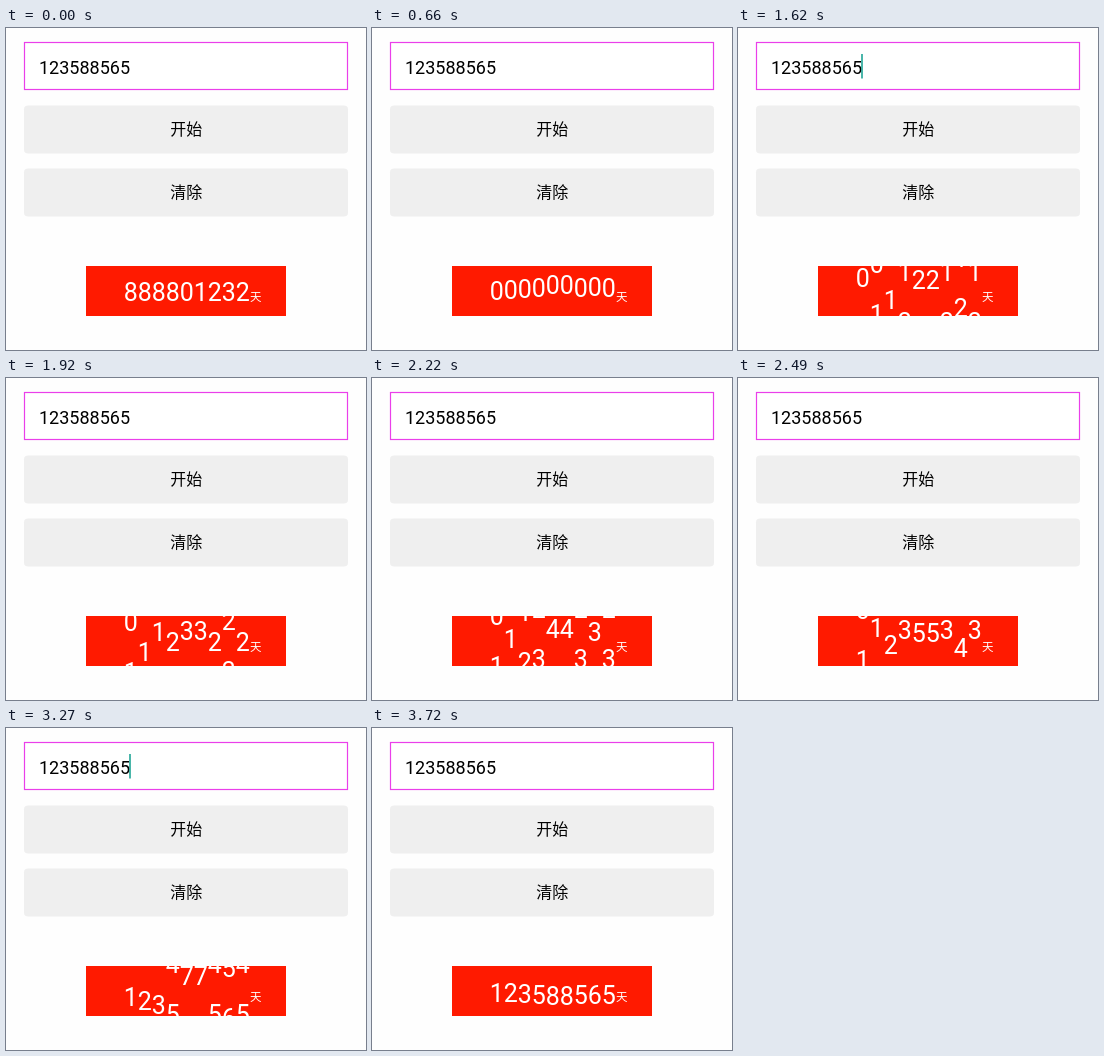
An HTML page for the animation above (3.9 s loop, 360 by 322 pixels).

```html
<!DOCTYPE html>
<html lang="zh-CN">
<head>
<meta charset="utf-8">
<style>
html, body { margin: 0; width: 100%; height: 100%; overflow: hidden; background: #fefefe; }
svg { display: block; font-family: Roboto, "Noto Sans CJK SC", "Noto Sans CJK", sans-serif; }
</style>
</head>
<body>
<svg width="360" height="322" viewBox="0 0 360 322">
  <clipPath id="window"><rect x="80" y="238" width="200" height="50"/></clipPath>
  <rect x="18.5" y="14.5" width="323" height="47" fill="#fff" stroke="#ea3fea" stroke-width="1.2"/>
  <text x="33" y="45.5" font-size="18">123588565</text>
  <rect id="caret" x="123.2" y="26" width="1.6" height="24.5" fill="#1fa596"/>
  <g fill="#efefef">
    <rect x="18" y="77.5" width="324" height="48" rx="4"/>
    <rect x="18" y="140.5" width="324" height="48" rx="4"/>
  </g>
  <g font-size="16" text-anchor="middle">
    <text x="180.3" y="107.3">开始</text>
    <text x="180.3" y="170.3">清除</text>
  </g>
  <rect x="80" y="238" width="200" height="50" fill="#ff1a00"/>
  <g id="reels" clip-path="url(#window)" fill="#fff" font-size="25"></g>
  <text x="244" y="273" font-size="11.5" fill="#fff">天</text>
</svg>
<script>
const LOOP = 3900, START = 340, DURATION = 3610, BLINK = 880;
const PITCH = 50, ADVANCE = 14.02, BASELINE = 273.4;
const previous = [...'888801232'].map(Number);
const target = [...'123588565'].map(Number);
const caret = document.getElementById('caret');
const reels = document.getElementById('reels');

// Each column shows two neighbouring digits at most.
const columns = target.map((_, i) => [0, 1].map(() => {
  const digit = document.createElementNS('http://www.w3.org/2000/svg', 'text');
  digit.setAttribute('x', 117.7 + i * ADVANCE);
  return reels.appendChild(digit);
}));

function draw(now) {
  const t = now % LOOP;
  const eased = (1 - Math.cos(Math.PI * (t - START) / DURATION)) / 2;
  columns.forEach((digits, i) => {
    const value = t < START ? previous[i] : target[i] * eased;
    const base = Math.floor(value);
    digits.forEach((digit, k) => {
      digit.textContent = (base + k) % 10;
      digit.setAttribute('y', BASELINE + (base + k - value) * PITCH);
    });
  });
  const lit = t >= 30 && Math.floor((t - 160) / BLINK) % 2 !== 0;
  caret.setAttribute('visibility', lit ? 'visible' : 'hidden');
}

const begin = performance.now();
function tick() {
  draw(performance.now() - begin);
  requestAnimationFrame(tick);
}
tick();
</script>
</body>
</html>
```
